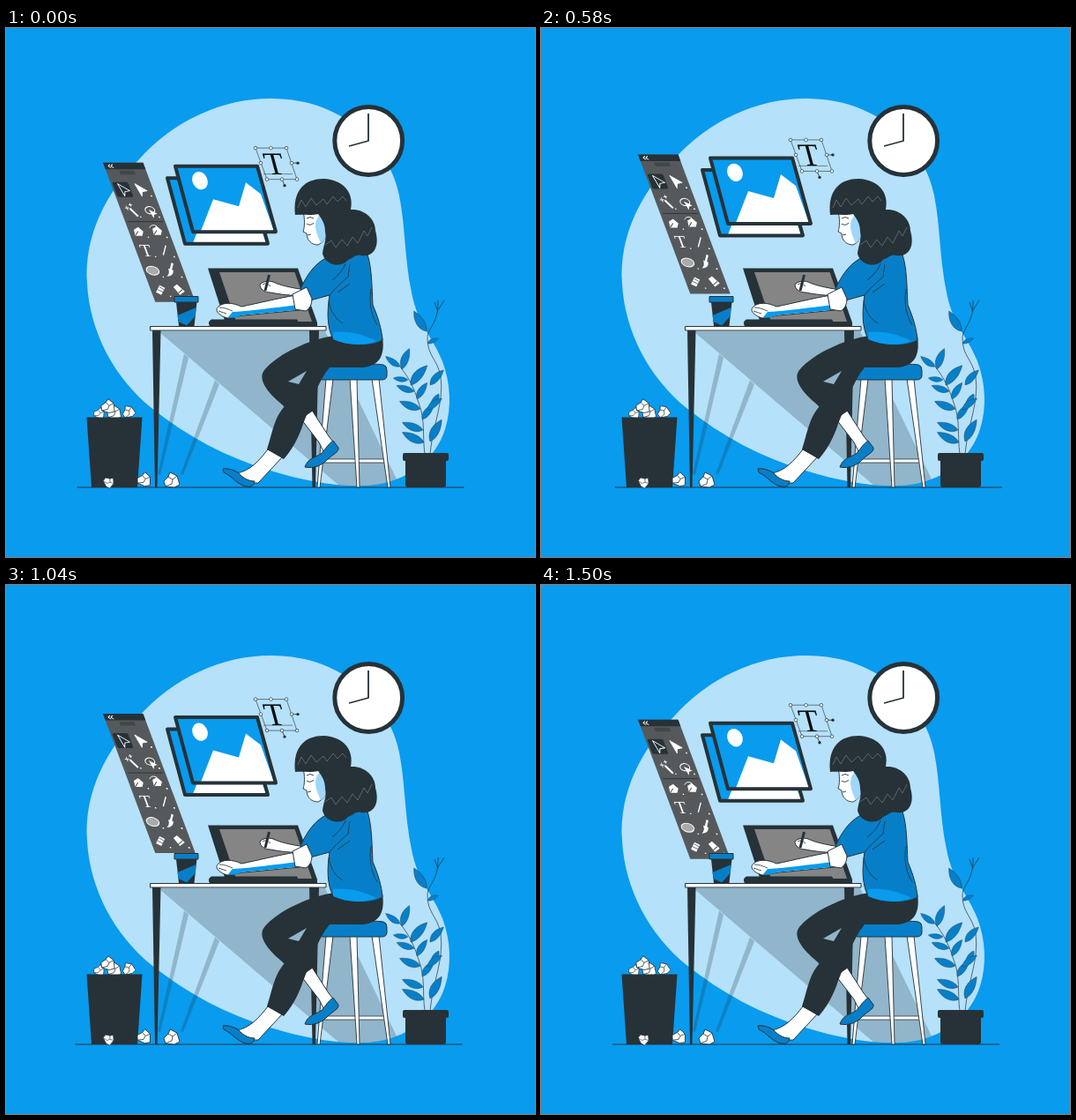
An HTML page with a canvas that plays this animation: 600 by 600 pixels, repeating every 1.54 s.

```html
<!DOCTYPE html>
<html lang="en">
<head>
<meta charset="utf-8">
<title>Designer at work</title>
<style>
html, body { margin: 0; width: 100%; height: 100%; overflow: hidden; background: #089bee; }
canvas { display: block; width: 600px; height: 600px; }
</style>
</head>
<body>
<canvas id="stage" width="600" height="600"></canvas>
<script>
const ctx = document.getElementById('stage').getContext('2d');
const SKY = '#089bee', PALE = '#b5e1fa', INK = '#263238', BLUE = '#077fc8', WHITE = '#fff';
const PANEL = '#56595b', SHADE = 'rgba(38,50,56,.25)';
const LOOP = 1540;
const SLANT = 0.375;
const blob = 'M300 80C345 80 378 95 400 115C425 138 440 160 446 190C453 225 452 262 460 300C467 337 484 350 495 378C504 402 506 430 498 455C487 489 459 510 425 517C390 523 345 516 300 502C250 487 205 463 165 431C123 397 95 345 92 290C88 235 115 185 150 150C190 105 245 80 300 80Z';

function shape(d, fill, stroke, width = 1) {
  const path = new Path2D(d);
  if (fill) { ctx.fillStyle = fill; ctx.fill(path); }
  if (stroke) { ctx.strokeStyle = stroke; ctx.lineWidth = width; ctx.stroke(path); }
}
const line = (d, color = INK, width = 1) => shape(d, null, color, width);

function oval(x, y, rx, ry, fill, stroke, width = 1, turn = 0) {
  ctx.beginPath();
  ctx.ellipse(x, y, rx, ry, turn, 0, Math.PI * 2);
  if (fill) { ctx.fillStyle = fill; ctx.fill(); }
  if (stroke) { ctx.strokeStyle = stroke; ctx.lineWidth = width; ctx.stroke(); }
}

function at(x, y, draw, skew = 0) {
  ctx.save();
  ctx.transform(1, 0, skew, 1, x, y);
  draw();
  ctx.restore();
}

function backdrop() {
  ctx.fillStyle = SKY;
  ctx.fillRect(0, 0, 600, 600);
  shape(blob, PALE);
  ctx.save();
  ctx.clip(new Path2D(blob));
  shape('M173 344H362L447 520H379Z', SHADE);
  ctx.restore();
  shape('M202 369.5L207 374L175 507L172 506Z', SHADE);
  shape('M237 399.5L242 404L201 507L198 506Z', SHADE);
}

function clock() {
  oval(411.2, 128, 38.4, 38.4, WHITE, INK, 5);
  line('M411 97V128L389 134', INK, 1.8);
}

function leaf(x, y, degrees, length) {
  ctx.save();
  ctx.translate(x, y);
  ctx.rotate(degrees * Math.PI / 180);
  ctx.scale(length / 20, length / 20);
  shape('M0 0C5 -5.5 13 -5 20 0C13 3.5 5 4 0 0Z', BLUE, INK, 0.3);
  ctx.restore();
}

function plant() {
  line('M475 483C472 462 476 445 468 425C463 409 458 398 447 384', INK, 0.7);
  line('M481 483C484 450 497 425 493 395C489 375 478 372 478 352C478 340 491 335 490 309M490 320L497 309M490 322L486 311', INK, 0.7);
  const leaves = [
    [447, 384, 215, 20], [449, 387, -70, 25], [456, 399, 187, 17], [459, 405, -50, 29],
    [463, 412, 198, 21], [466, 421, -58, 22], [470, 432, 200, 25], [472, 444, -52, 22],
    [473, 456, 200, 25], [474, 470, 205, 27],
    [477, 344, 238, 27], [478, 358, -25, 14],
    [481, 405, -48, 23], [491, 415, 125, 18], [478, 433, -38, 21], [481, 469, -62, 28]
  ];
  leaves.forEach(l => leaf(...l));
  shape('M453 488H499V518Q499 521 496 521H456Q453 521 453 518Z', INK);
  shape('M452 482H500Q502 482 502 484V489Q502 491 500 491H452Q450 491 450 489V484Q450 482 452 482Z', INK);
}

function paper(x, y, size, turn = 0) {
  ctx.save();
  ctx.translate(x, y);
  ctx.rotate(turn);
  ctx.scale(size / 10, size / 10);
  shape('M-9 1L-4 -4L-2 -9L6 -5L9 5L3 8L-7 7Z', WHITE, INK, 0.9);
  line('M-4 -4L1 -1L6 -5M1 -1L0 4L-7 7', INK, 0.8);
  ctx.restore();
}

function bin() {
  paper(106, 437, 7, 0.4);
  paper(123, 436, 9, 0.1);
  paper(139, 435, 8, -0.3);
  paper(116, 429, 9, 0.2);
  shape('M91.5 441.5H154.5L149 521H97Z', INK);
  paper(117, 515, 7, 1);
  paper(157, 512, 9, 0.3);
  paper(188, 513, 10, 0);
}

function arrow(x, y, fill) {
  at(x, y, () => shape('M-4 -6L7 2L1 3L-1 8Z', fill, WHITE, 0.9));
}

function nib(x, y) {
  at(x, y, () => {
    shape('M-5 4L-4 -3L2 -6L6 -1L3 4Z', WHITE);
    line('M-5 4L0 -1M2 -7L7 -1', PANEL, 0.9);
  });
}

function toolbox() {
  const left = 11.5, right = 32;
  ctx.fillStyle = PANEL;
  ctx.fillRect(0, 0, 45.5, 158);
  ctx.fillStyle = INK;
  ctx.fillRect(0, 0, 45.5, 7.5);
  ctx.fillStyle = '#3f474b';
  ctx.fillRect(15, 9, 17, 4.5);
  line('M7 2L4.5 4L7 6M10 2L7.5 4L10 6', WHITE, 0.9);
  shape('M4 22H18Q20 22 20 24V37Q20 39 18 39H4Q2 39 2 37V24Q2 22 4 22Z', INK);
  line('M3 67H43', INK, 0.8);

  arrow(left, 30, INK);
  arrow(right - 1, 30, WHITE);

  line('M11 52L17 61', WHITE, 2.5);
  line('M8 49V54M5.5 51.5H10.5M13 46V50M11 48H15', WHITE, 0.8);
  oval(33, 54, 5.5, 4, null, WHITE, 1, -0.2);
  shape('M32 53L40 58L36 59L34 63Z', WHITE);

  nib(left - 1, 79);
  nib(right, 78);
  line('M25 74Q29 69 34 72', WHITE, 0.8);

  ctx.fillStyle = WHITE;
  ctx.textAlign = 'center';
  ctx.font = '20px "Liberation Serif", serif';
  ctx.fillText('T', left, 106);
  line('M29 105L36 94', WHITE, 1.2);

  oval(left - 1, 122.5, 7, 5, '#aaa', WHITE, 1);
  line('M36 114L31 122', WHITE, 2.2);
  shape('M29 120L34 122Q32 129 24 129Q29 126 29 120Z', WHITE);

  shape('M5 147L12 139L17 142L10 150Z', WHITE);
  line('M8 144L13 147M11 141L15 144', PANEL, 0.8);
  shape('M27 141L32 138L38 146L31 150Z', WHITE);
  line('M30 148L36 144', PANEL, 1);

  ctx.fillStyle = WHITE;
  for (const y of [37, 61, 84, 106, 129, 151]) {
    ctx.fillRect(40, y, 1.6, 1.6);
    if (y > 37) ctx.fillRect(19, y, 1.4, 1.4);
  }
}

function picture() {
  shape('M192 156.5H285L306 231H212Z', SKY);
  shape('M221 230L235 194L264 202L272 175L289 188L304 230Z', WHITE);
  oval(220, 173, 8.5, 10.5, WHITE, null, 1, -0.45);
  line('M192 156.5H285L306 231H212Z', INK, 4);
}

function pictures() {
  at(-9, 13.5, picture);
  picture();
}

function typeBox() {
  line('M283 136H318L330 171.5H296Z', '#4b5a64', 0.8);
  line('M324 153H331M313 171.5L316 178.5', INK, 0.8);
  line('M292 165.5H325', '#4b5a64', 0.7);
  at(307.5, 165.5, () => {
    ctx.fillStyle = '#080c0e';
    ctx.textAlign = 'center';
    ctx.font = '36px "Liberation Serif", serif';
    ctx.fillText('T', 0, 0);
  }, 0.27);
  const handles = [[283, 136], [300.5, 136], [318, 136], [324, 153], [330, 171.5], [313, 171.5], [296, 171.5], [289, 153]];
  for (const [x, y] of handles) oval(x, y, 1.8, 1.8, WHITE, INK, 0.7);
  oval(331, 153, 1.7, 1.7, INK);
  oval(316, 178.5, 1.7, 1.7, INK);
}

function floating(lift) {
  at(110, 152.5 - lift, toolbox, SLANT);
  at(0, -lift, () => { pictures(); typeBox(); });
}

function desk() {
  shape('M166 343H175.5L171.5 521H169Z', INK);
  shape('M344 343H355L351 521H347.5Z', INK);
  shape('M163.5 338.5H363V343H163.5Z', WHITE, INK, 1);
  shape('M193 311H216.5L213.5 338H196Z', INK);
  shape('M194.5 326L215.5 317L214.5 327L205 337.5L195.5 333Z', BLUE);
  shape('M191 304.5H218V311H191Z', BLUE, INK, 1);
  shape('M229 272.5H331L353 334V338H250Z', INK);
  shape('M242 277H327.5L347 333H261Z', '#858585');
  shape('M233 330.5H330L334 338H231Q228 333 233 330.5Z', INK);
}

function legs() {
  shape('M332 440L346 432L366 463L374 473L362 484L355 470Z', WHITE, INK, 1);
  shape('M339 498C342 488 351 487 357 483C361 480 364 473 371 468L377 476C378 481 370 484 365 489C359 496 349 500 339 498Z', BLUE, INK, 1);
  shape('M297 478L314 486L286 516C278 517 268 513 261 505C276 503 287 491 297 478Z', WHITE, INK, 1);
  shape('M246 500C251 499 257 501 263 504C270 512 277 514 282 514Q282 519 276 520.5C263 520 258 509 247 504Z', BLUE, INK, 1);
  shape('M372 349C345 353 309 369 293 388C285 398 296 413 313 427L331 446L350 433L340 416L334 404Z', INK);
  shape('M427 350C430 371 424 383 405 385H367C353 402 348 423 337 449C332 465 324 479 315 489L296 478C302 460 304 441 317 428C327 410 340 371 372 350Z', INK);
  shape('M320 401L341 389L332 404Z', '#91b5c9');
}

function stool() {
  const leg = (x1, x2) => shape(`M${x1} 398H${x1 + 8}L${x2 + 3} 521H${x2}Z`, WHITE, INK, 0.9);
  shape('M358 489H432V493H357Z', WHITE, INK, 0.8);
  leg(363, 353);
  leg(390, 398);
  leg(415, 433);
  shape('M359 384C372 381 414 380 428 382Q432 383 432 388V394Q432 399 426 399H360Q354 399 354 393V389Q354 385 359 384Z', BLUE, INK, 1);
}

function body() {
  // far arm and pen
  shape('M340 297C325 295 311 292 303 288C297 286 290 288 288 291C288 296 293 300 300 300C310 302 324 304 338 303Z', WHITE, INK, 1);
  line('M294 298L298.5 280', INK, 3);
  line('M291 291Q295 288 300 293', INK, 0.8);

  shape('M365 260C383 256 398 255 410 257C415 272 415 294 416 314C422 328 426 341 427 354C414 362 388 361 371 353C364 339 364 322 367 303L345 309L334 296C341 280 351 266 365 260Z', BLUE, INK, 1);
  shape('M371 345C384 343 403 346 420 355C406 361 386 360 371 353Z', SKY);
  line('M367 303C373 295 383 287 389 281M376 300L390 290M370 286C378 280 383 273 385 267M366 309C368 323 375 331 382 335M414 296C411 313 415 327 421 337M390 268L388 281', INK, 0.8);

  // near arm
  shape('M329 303C306 307 287 312 267 316C257 311 246 311 241 316C236 320 241 326 251 329C259 329 265 326 270 326L333 320Z', WHITE, INK, 1);
  shape('M257 322C280 321 304 317 331 314L333 319.5L269 325.5Q258 330 252 328Z', SKY);
  line('M242 317C248 317 252 319 257 321M241 321L250 324', INK, 0.8);
  shape('M325 302L341 294L347 307Q347 317 340 321L328 319Z', WHITE, INK, 1);
}

function head() {
  shape('M337 207C339 217 339 225 337 231L341 233C341 240 346 246 354 246Q363 242 368 226L364 204Z', WHITE, INK, 0.9);
  shape('M356 212C347 221 352 233 357 244Q365 239 367 225L364 207Z', '#9ed7fa');
  line('M341 222Q345 225 349 221M341 216Q345 213 349 216M342 235L346 234', INK, 0.9);
  shape('M328 212C325 184 339 171 360 171C383 172 395 187 391 206C406 205 419 216 419 230C424 247 418 260 403 258C398 256 395 260 388 263C380 273 362 269 359 256C360 246 364 241 362 231C362 222 358 216 354 211C345 213 337 211 328 212Z', INK);
  const gray = '#67737a';
  line('M331 204L335 195L340 203L346 193L352 201L360 194L364 200L371 191L376 197L382 191L386 196', gray, 0.8);
  line('M362 246L369 241L374 249L381 240L387 247L393 237L399 244L406 230L410 236L415 226', gray, 0.8);
}

// Quick sideways drift of the ground line: [ms, px]
const drift = [[0, 0.5], [210, 2], [380, -1.5], [440, -3.3], [540, 3.2], [580, 4], [880, 5], [1000, -3.2], [1080, 0], [1210, 2], [1500, 1], [LOOP, 0.5]];

function driftAt(t) {
  const i = drift.findIndex(([ms]) => ms > t);
  const [t0, x0] = drift[i - 1], [t1, x1] = drift[i];
  return x0 + (x1 - x0) * (t - t0) / (t1 - t0);
}

function draw(t) {
  const lift = 4.9 + 5.1 * Math.cos((t - 730) / LOOP * Math.PI * 2);
  const x = 80 + driftAt(t);
  backdrop();
  line(`M${x} 521H${x + 439}`, INK, 1);
  plant();
  clock();
  floating(lift);
  bin();
  desk();
  stool();
  legs();
  body();
  head();
}

ctx.lineJoin = 'round';
const start = performance.now();
function tick(now) {
  draw(Math.max(0, now - start) % LOOP);
  requestAnimationFrame(tick);
}
requestAnimationFrame(tick);
</script>
</body>
</html>
```
